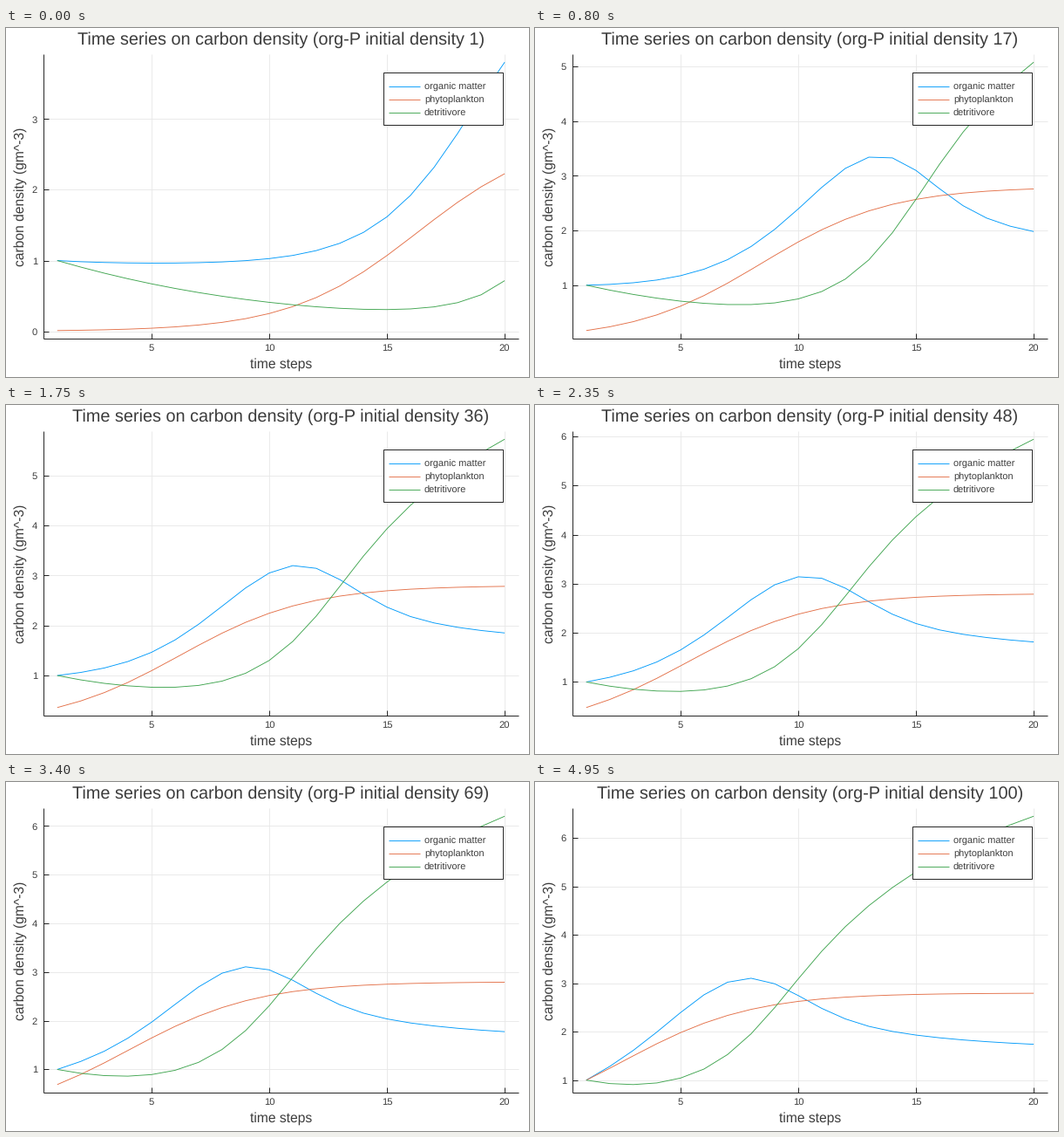
A matplotlib script for the animation above (5000 ms loop, 600 by 400 pixels).

```python
import numpy as np
import matplotlib.pyplot as plt
from matplotlib.animation import FuncAnimation
from matplotlib.patches import Rectangle

W, H, DPI = 600, 400, 100
PX = 72 / DPI  # points per pixel
LEFT, RIGHT, TOP, BOTTOM = 43.4, 587.5, 30, 356
LINE = 0.9 * PX
INK, GRID = "#3c3c3c", "#e8e8e8"
AXIS = "#111111"
NAMES = ["organic matter", "phytoplankton", "detritivore"]
COLORS = ["#009afa", "#e36f47", "#3ea44e"]
FRAMES, STEPS, SUB = 100, 20, 20

# Rates per time step
GROWTH, CAPACITY = 0.368, 2.8
P_LOSS = 0.158
UPTAKE, GAIN = 0.2823, 0.1646
D_LOSS = 0.2604


def rates(state):
    """Carbon flow between organic matter, phytoplankton and detritivores."""
    o, p, d = state
    crowding = GROWTH * p * p / CAPACITY
    return np.array([
        P_LOSS * p + crowding + D_LOSS * d - UPTAKE * o * d,
        GROWTH * p - crowding,
        GAIN * o * d - D_LOSS * d,
    ])


def simulate(p0):
    """Runge-Kutta for all initial densities at once: [step, species, run]."""
    state = np.array([np.ones_like(p0), p0, np.ones_like(p0)])
    out, h = [state], 1 / SUB
    for _ in range(STEPS - 1):
        for _ in range(SUB):
            k1 = rates(state)
            k2 = rates(state + h / 2 * k1)
            k3 = rates(state + h / 2 * k2)
            k4 = rates(state + h * k3)
            state = state + h / 6 * (k1 + 2 * k2 + 2 * k3 + k4)
        out.append(state)
    return np.array(out)


runs = simulate(np.arange(1, FRAMES + 1) / 100)

plt.rcParams["font.family"] = "Liberation Sans"
plt.rcParams["text.hinting"] = "none"
fig = plt.figure(figsize=(W / DPI, H / DPI), dpi=DPI, facecolor="white")
ax = fig.add_axes([0, 0, 1, 1])
ax.set_xlim(0, W)
ax.set_ylim(H, 0)
ax.axis("off")


def line(xs, ys, color, z, snap=True):
    return ax.plot(xs, ys, color=color, lw=LINE, zorder=z, snap=snap,
                   solid_capstyle="butt")[0]


def text(x, y, label, size, ha="center", z=5, **kw):
    return ax.text(x, y, label, fontsize=size * PX, color=INK, ha=ha,
                   va="baseline", zorder=z, **kw)


def x_px(step):
    pad = 0.03 * (STEPS - 1)
    return LEFT + (step - 1 + pad) / (STEPS - 1 + 2 * pad) * (RIGHT - LEFT)


# Axes and fixed labels
mid = (LEFT + RIGHT) / 2
line([LEFT, RIGHT], [BOTTOM, BOTTOM], AXIS, 3)
line([LEFT, LEFT], [TOP, BOTTOM], AXIS, 3)
for step in (5, 10, 15, 20):
    x = x_px(step)
    line([x, x], [TOP, BOTTOM], GRID, 1)
    line([x, x], [BOTTOM - 6, BOTTOM], AXIS, 3)
    text(x, 370, str(step), 11.3)
text(mid, 389.5, "time steps", 15.6)
text(21, (TOP + BOTTOM) / 2, "carbon density (gm^-3)", 15.6, rotation=90,
     rotation_mode="anchor")
title = text(mid, 19, "", 19.9)

# Horizontal grid, one set per whole number
y_ticks = [(line([LEFT, RIGHT], [0, 0], GRID, 1),
            line([LEFT, LEFT + 6], [0, 0], AXIS, 3),
            text(36, 0, str(v), 11.3, ha="right"))
           for v in range(8)]

steps_px = x_px(np.arange(1, STEPS + 1))
curves = [line(steps_px, steps_px, c, 4, snap=False) for c in COLORS]

# Legend
ax.add_patch(Rectangle((433, 51), 137, 60, fc="white", ec=AXIS, lw=LINE,
                       zorder=6))
for i, (name, color) in enumerate(zip(NAMES, COLORS)):
    y = 67 + 15 * i
    line([439, 475], [y, y], color, 7)
    text(479.8, y + 3.9, name, 11, ha="left", z=7)


def update(i):
    data = runs[:, :, i]
    pad = 0.03 * np.ptp(data)
    low, high = data.min() - pad, data.max() + pad

    def y_px(v):
        return BOTTOM - (v - low) / (high - low) * (BOTTOM - TOP)

    for curve, values in zip(curves, data.T):
        curve.set_ydata(y_px(values))
    for v, (grid, tick, label) in enumerate(y_ticks):
        y = y_px(v)
        for part in (grid, tick):
            part.set_ydata([y, y])
        label.set_y(y + 4)
        for part in (grid, tick, label):
            part.set_visible(low <= v <= high)
    title.set_text("Time series on carbon density "
                   f"(org-P initial density {i + 1})")
    return [title, *curves]


anim = FuncAnimation(fig, update, frames=FRAMES, interval=50, repeat=True,
                     repeat_delay=0, blit=False)
plt.show()
```
